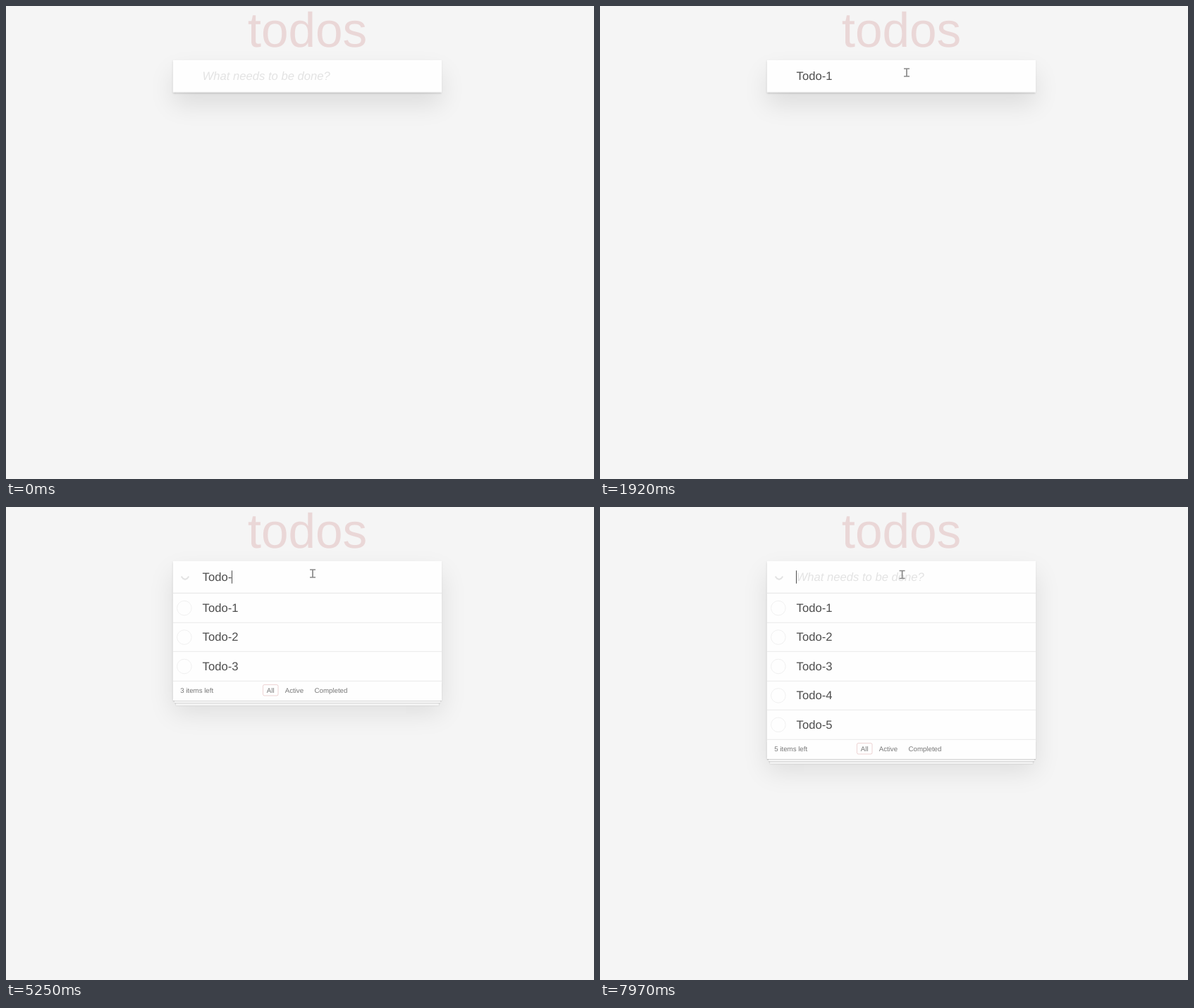
An HTML page with a canvas for the animation above (7.99 s loop, 834x672 px).

```html
<!DOCTYPE html>
<html lang="en">
<head>
<meta charset="utf-8">
<title>todos</title>
<style>
  html, body { margin: 0; width: 100%; height: 100%; overflow: hidden; background: #f5f5f5; }
  canvas { display: block; }
</style>
</head>
<body>
<canvas id="stage" width="834" height="672"></canvas>
<script>
const ctx = document.getElementById('stage').getContext('2d');
const LOOP = 7990;
const S = 0.693;                       // page zoom
const LEFT = 236.9, TOP = 76.9, WIDTH = 550 * S;
const ROW = 59.8 * S, TEXT_X = 278.6;
const FAMILY = '"Liberation Sans", Arial, sans-serif';
const BODY = `${24 * S}px ${FAMILY}`;
const SMALL = `${14 * S}px ${FAMILY}`;

const typed = [
  [0, ''], [1390, 'Todo-1'], [2290, ''],
  [2730, 'Todo-1'], [3150, 'Todo-'], [3280, 'Todo-2'], [3460, ''],
  [3800, 'Todo-1'], [4160, 'Todo-'], [4340, 'Todo-3'], [4550, ''],
  [4990, 'Todo-1'], [5250, 'Todo-'], [5510, 'Todo-4'], [5790, ''],
  [6290, 'Todo-1'], [6560, 'Todo-'], [6790, 'Todo-5'], [7230, '']
];
const submits = [2290, 3460, 4550, 5790, 7230];
const caretToggles = [950, 1920, 2440, 4910, 4990, 6100, 6290, 7290, 7820];

const passed = (times, t) => times.filter(x => x <= t).length;
const mix = (a, b, p) => a + (b - a) * p;
const span = (t, a, b) => Math.min(1, Math.max(0, (t - a) / (b - a)));

function text(str, x, y, font, color) {
  ctx.font = font;
  ctx.fillStyle = color;
  ctx.fillText(str, x, y);
}

function rect(x, y, w, h, color) {
  ctx.fillStyle = color;
  ctx.fillRect(x, y, w, h);
}

function shadowRect(x, y, w, h, color, dy, blur, alpha) {
  ctx.save();
  ctx.shadowColor = `rgba(0,0,0,${alpha})`;
  ctx.shadowOffsetY = dy * S;
  ctx.shadowBlur = blur * S;
  rect(x, y, w, h, color);
  ctx.restore();
}

function path(points) {
  ctx.beginPath();
  points.forEach(([x, y]) => ctx.lineTo(x, y));
}

function drawPanel(count) {
  const height = (count ? 65.6 + 59.8 * count + 41 : 65.6) * S;
  const bottom = TOP + height;
  shadowRect(LEFT, TOP, WIDTH, height, '#fff', 25, 50, 0.1);
  shadowRect(LEFT, TOP, WIDTH, height, '#fff', 2, 4, 0.2);
  if (count) {
    for (const [inset, drop, blur] of [[6, 10, 2], [3, 5, 1]]) {
      shadowRect(LEFT + inset * S, bottom - 25, WIDTH - 2 * inset * S, 25 + drop * S, '#f6f6f6', 1, blur, 0.2);
    }
    shadowRect(LEFT, bottom - 25, WIDTH, 25, '#fff', 1, 1, 0.2);
  }
  rect(LEFT, TOP, WIDTH, height, '#fefefe');
  rect(LEFT, TOP + 64.2 * S, WIDTH, 1.4 * S, '#f7f7f7');
}

function drawItems(count) {
  rect(LEFT, 122, WIDTH, 1, '#e9e9e9');
  ctx.strokeStyle = '#e3e3e3';
  ctx.lineWidth = 2;
  path([[248.6, 98.6], [251.2, 101.6], [254, 103], [256.8, 101.6], [259.4, 98.6]]);
  ctx.stroke();

  for (let i = 0; i < count; i++) {
    const y = i * ROW;
    ctx.strokeStyle = '#ededed';
    ctx.lineWidth = 0.8;
    ctx.beginPath();
    ctx.arc(252.9, 143.6 + y, 10.3, 0, Math.PI * 2);
    ctx.stroke();
    text(`Todo-${i + 1}`, TEXT_X, Math.round(149 + y), BODY, '#4d4d4d');
    rect(LEFT, Math.round(163.9 + y) - 0.2, WIDTH, 1, '#e9e9e9');
  }
}

function drawFooter(count) {
  const y = Math.round(163.9 + (count - 1) * ROW);
  const base = y + 17;
  text(`${count} item${count > 1 ? 's' : ''} left`, 247.3, base, SMALL, '#777');
  text('All', 369.8, base, SMALL, '#777');
  text('Active', 395.7, base, SMALL, '#777');
  text('Completed', 437.5, base, SMALL, '#777');
  ctx.strokeStyle = 'rgba(175,47,47,0.2)';
  ctx.lineWidth = 1;
  ctx.beginPath();
  ctx.roundRect(364.5, y + 5.5, 21.5, 15.5, 2);
  ctx.stroke();
}

function drawInput(t) {
  const value = typed.filter(e => e[0] <= t).pop()[1];
  if (value) text(value, TEXT_X, 105, BODY, '#4d4d4d');
  else text('What needs to be done?', TEXT_X, 105, 'italic ' + BODY, '#e3e3e3');
  if (passed(caretToggles, t) % 2) {
    ctx.font = BODY;
    rect(Math.floor(TEXT_X + ctx.measureText(value).width), 90.3, 1, 18.4, '#4d4d4d');
  }
}

function pointer(t) {
  if (t < 830) {
    const p = 1 - Math.pow(1 - span(t, 40, 830), 2.8);
    return [mix(808, 438, p), mix(665, 100, p)];
  }
  if (t < 1050) {
    const up = span(t, 830, 920), down = span(t, 960, 1050);
    return [mix(438, 435, up), mix(100, 92, up) + 2.5 * down];
  }
  const p = span(t, 7800, 7970);
  return [mix(435, 428.6, p), mix(94.5, 96, p)];
}

function drawPointer(t) {
  if (t < 40) return;
  const [x, y] = pointer(t);
  ctx.save();
  ctx.translate(x, y);
  if (y > TOP + 65.6 * S) {
    path([[0, 0], [0, 11.4], [2.6, 9], [4.2, 12.8], [6.1, 12], [4.5, 8.2], [8, 8.2]]);
    ctx.closePath();
    ctx.strokeStyle = '#fff';
    ctx.lineWidth = 1.4;
    ctx.stroke();
    ctx.fillStyle = '#262626';
    ctx.fill();
  } else {
    rect(-0.8, -5.5, 1.6, 11, '#808080');
    rect(-4, -6.2, 8, 1.5, '#8a8a8a');
    rect(-4, 4.7, 8, 1.5, '#8a8a8a');
  }
  ctx.restore();
}

function draw(t) {
  const count = passed(submits, t);
  rect(0, 0, 834, 672, '#f5f5f5');
  ctx.textAlign = 'center';
  text('todos', LEFT + WIDTH / 2, 58, `${100 * S}px ${FAMILY}`, 'rgba(175,47,47,0.15)');
  ctx.textAlign = 'left';
  drawPanel(count);
  if (count) {
    drawItems(count);
    drawFooter(count);
  }
  drawInput(t);
  drawPointer(t);
}

ctx.fontKerning = 'normal';
ctx.textRendering = 'geometricPrecision';
const start = performance.now();
function tick() {
  draw((performance.now() - start) % LOOP);
  requestAnimationFrame(tick);
}
tick();
</script>
</body>
</html>
```
